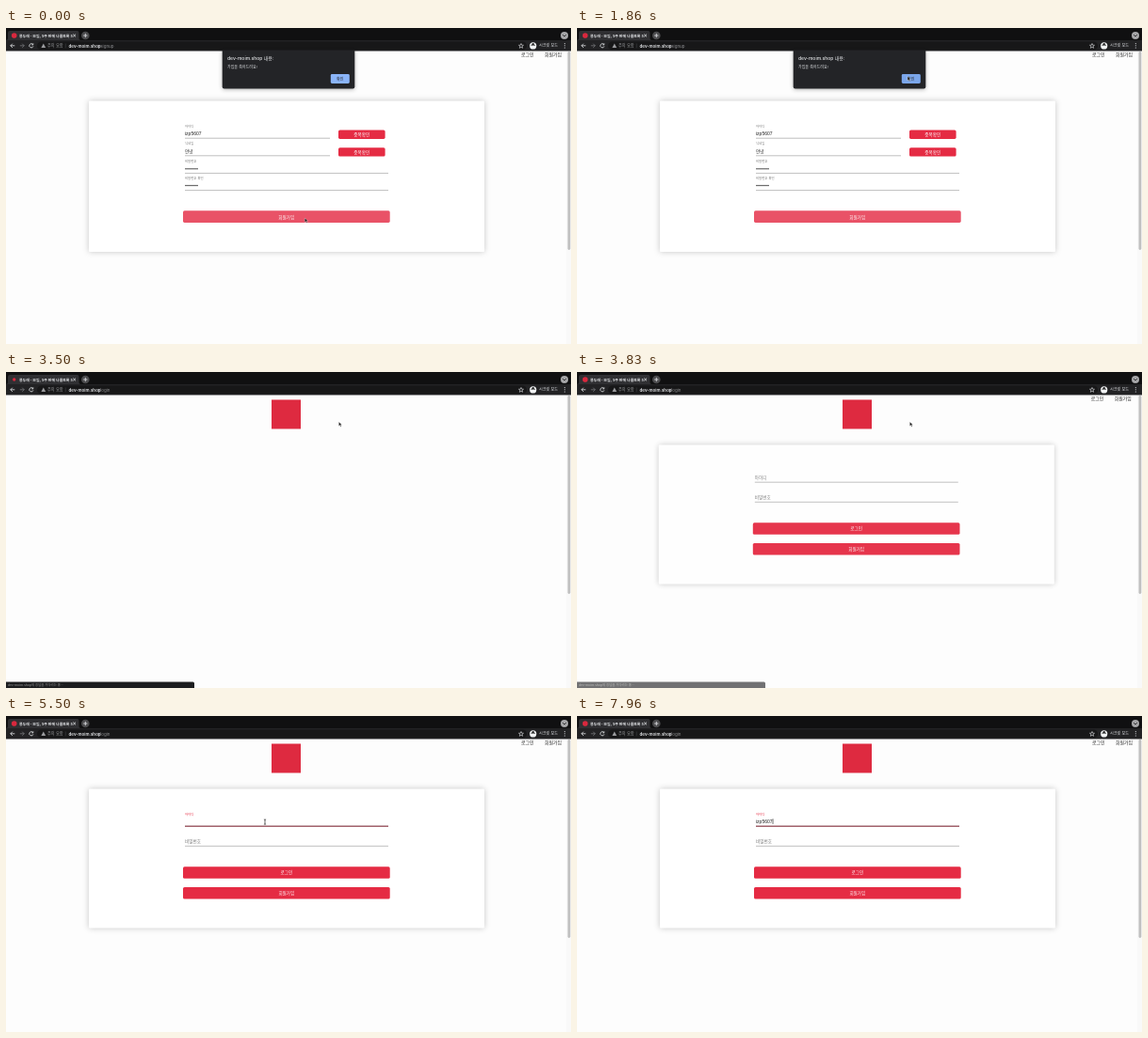
Animation of 600x336 px, one loop 8 s. Source, as an HTML page:

```html
<!DOCTYPE html>
<html lang="ko">
<head>
<meta charset="utf-8">
<style>
html, body { margin: 0; width: 100%; height: 100%; overflow: hidden; background: #fdfdfd; }
svg { display: block; width: 100%; height: 100%; }
text { font: 4.6px "Noto Sans CJK KR", "Noto Sans CJK", sans-serif; white-space: pre; }
.mid { text-anchor: middle; }
.bold { font-weight: 700; }
.latin { font: 5px "Liberation Sans", sans-serif; }
.small { font-size: 3.4px; }
.card { fill: #fff; filter: drop-shadow(0 0 3px rgba(0, 0, 0, .22)); }
.line { stroke: #949494; stroke-width: .6; }
.icon { fill: none; stroke: #e8eaed; stroke-width: .8; }
</style>
</head>
<body>
<svg viewBox="0 0 600 336">
  <rect width="600" height="336" fill="#fdfdfd"/>
  <rect x="595" y="24" width="5" height="312" fill="#f9f9f9"/>
  <rect x="596.5" y="25" width="2.8" height="211" rx="1.4" fill="#c0c0c0"/>
  <rect x="282" y="29.5" width="31" height="31" fill="#de2a40"/>

  <g id="nav" fill="#222">
    <text x="547" y="29.6" style="font-size:4.9px">로그인</text>
    <text x="572" y="29.6" style="font-size:4.9px">회원가입</text>
  </g>

  <g id="signup">
    <rect class="card" x="88" y="77.5" width="420" height="160.5" rx="1"/>
    <g id="signupForm"></g>
    <rect id="submit" x="188" y="194.3" width="219.7" height="12.6" rx="1.6" fill="#e95267"/>
    <text class="mid" x="297.8" y="202.5" fill="#fff">회원가입</text>
  </g>

  <g id="login">
    <rect class="card" x="88" y="77.5" width="420" height="148" rx="1"/>
    <path id="idLine" class="line" d="M190 117.2H406"/>
    <path class="line" d="M190 138.3H406"/>
    <path id="focusLine" d="M-108 0H108" stroke="#9c3446" stroke-width=".9"/>
    <text id="idLabel">아이디</text>
    <text x="190" y="134.8" fill="#777">비밀번호</text>
    <g id="loginButtons"></g>
    <text id="typed" class="latin" x="190" y="114" fill="#222"></text>
    <rect id="caret" y="109.3" width=".6" height="5.6" fill="#111"/>
    <g id="suggest">
      <rect x="189.3" y="117.8" width="60" height="16" rx="1" fill="#202124" stroke="#555" stroke-width=".3"/>
      <text class="bold" x="193" y="127.3" fill="#fff" style="font:600 4px Inter,sans-serif">izp3948</text>
    </g>
  </g>

  <g id="status">
    <path d="M0 329.5H198.5Q200 329.5 200 331V336H0Z" fill="#1c1d1f"/>
    <text class="small" x="2" y="334" fill="#9a9a9a">dev-moim.shop의 응답을 기다리는 중…</text>
  </g>

  <g id="browser">
    <rect width="600" height="24.5" fill="#222224"/>
    <rect width="600" height="13" fill="#101011"/>
    <path d="M0 13Q2 13 2 11V5Q2 3 4 3H75.5Q77.5 3 77.5 5V11Q77.5 13 79.5 13Z" fill="#303033"/>
    <rect x="33" y="14.5" width="520" height="8.8" rx="4.4" fill="#171718"/>
    <circle id="favicon" cx="8.7" cy="8" fill="#d9283e"/>
    <text class="bold" x="14" y="9.5" fill="#e8eaed" style="font-size:3.9px">콩두레 - 모임, 5주 만에 나를토록 5</text>
    <path class="icon" d="M71.2 6.6l2.8 2.8m0-2.8l-2.8 2.8"/>
    <circle cx="84.3" cy="8" r="4.3" fill="#4b4b4d"/>
    <path class="icon" d="M82.2 8h4.2m-2.1-2.1v4.2"/>
    <circle cx="593" cy="8" r="4" fill="#a5a5a7"/>
    <path d="M591.2 7.2l1.8 1.8 1.8-1.8" fill="none" stroke="#222" stroke-width=".9"/>
    <path class="icon" d="M9.3 18.8H4.8m2.1-2.1l-2.1 2.1 2.1 2.1"/>
    <path class="icon" style="stroke:#77787b" d="M14.8 18.8h4.5m-2.1-2.1l2.1 2.1-2.1 2.1"/>
    <path class="icon" d="M28.4 17.3A2.1 2.1 0 1 0 28.9 19.4M28.8 16.3v1.6h-1.6"/>
    <path d="M39.8 16.5L42.2 21H37.4Z" fill="#9a9b9e"/>
    <text x="44" y="20.4" fill="#9a9b9e" style="font-size:4.2px">주의 요함</text>
    <path d="M63.3 16.5v4.8" stroke="#55565a" stroke-width=".4"/>
    <text x="66.5" y="20.5" fill="#e8eaed" style="font:600 4.5px Inter,sans-serif">dev-moim.shop</text>
    <text id="path" x="98.6" y="20.5" fill="#909194" style="font:4.5px Inter,sans-serif"></text>
    <path class="icon" style="stroke-width:.6" d="M547 16.5l.7 1.7 1.8.1-1.4 1.2.5 1.8-1.6-1-1.6 1 .5-1.8-1.4-1.2 1.8-.1z"/>
    <circle cx="559.7" cy="18.9" r="3.6" fill="#f1f3f4"/>
    <path d="M557.4 18.5h4.6M558.5 18l.4-1.4h1.6l.4 1.4" stroke="#222" stroke-width=".6" fill="#222"/>
    <text x="566" y="20.4" fill="#e8eaed" style="font-size:4.1px">시크릿 모드</text>
    <path d="M593.3 16.6v.01M593.3 18.8v.01M593.3 21v.01" stroke="#e8eaed" stroke-width="1.1" stroke-linecap="round"/>
  </g>

  <g id="dialog">
    <path d="M229.7 24H370.3V62.5Q370.3 64.5 368.3 64.5H231.7Q229.7 64.5 229.7 62.5Z" fill="#232427" style="filter:drop-shadow(0 1px 2px rgba(0,0,0,.3))"/>
    <text x="235" y="33.8" fill="#e8eaed" style="font:500 5px Inter,'Noto Sans CJK KR',sans-serif">dev-moim.shop 내용:</text>
    <text x="235" y="42.6" fill="#e8eaed" style="font-size:4px">가입을 축하드려요!</text>
    <rect id="ok" x="344.8" y="49" width="20" height="10" rx="1.4"/>
    <text class="mid" x="354.8" y="55.6" fill="#202124" style="font-size:4.1px">확인</text>
  </g>

  <path id="arrow" d="M0 0V4.6L1.1 3.6 1.9 5.3 2.7 4.9 1.9 3.3H3.3Z" fill="#111" stroke="#fff" stroke-width=".35"/>
  <path id="beam" d="M-1.1 -2.7Q0 -2.7 0 -2V2Q0 2.7 -1.1 2.7M1.1 -2.7Q0 -2.7 0 -2M0 2Q0 2.7 1.1 2.7" fill="none" stroke="#222" stroke-width=".7"/>
</svg>
<script>
const LOOP = 8000;
const CLOSE = 2950, STATUS = 3100, LEAVE = 3430, LOADED = 3680, SETTLED = 3980, FOCUS = 4850;
const NAME = 'izp5607';
const KEYS = [5900, 6120, 6350, 6880, 7080, 7280, 7500];
const POINTER = [[0, 317.3, 202], [250, 317.3, 202], [1150, 351, 51.3], [2950, 351, 51.3],
  [3250, 353.4, 53], [4120, 353.4, 53], [4520, 275, 112.6], [LOOP, 275, 112.6]];

const el = id => document.getElementById(id);
const show = (id, on) => el(id).setAttribute('visibility', on ? 'visible' : 'hidden');
const set = (id, attrs) => {
  for (const key in attrs) el(id).setAttribute(key, attrs[key]);
};
const ramp = (t, start, length) => {
  const p = Math.min(1, Math.max(0, (t - start) / length));
  return p * p * (3 - 2 * p);
};

const button = (x, y, w, h, label) =>
  `<rect x="${x}" y="${y}" width="${w}" height="${h}" rx="1.6" fill="#e52b43"/>
   <text class="mid" x="${x + w / 2}" y="${y + h / 2 + 1.8}" fill="#fff">${label}</text>`;
const field = (y, label, value, right, cls = '') =>
  `<text class="small" x="190" y="${y - 11.6}" fill="#777">${label}</text>
   <text class="${cls}" x="190" y="${y - 3.2}" fill="#222">${value}</text>
   <path class="line" d="M190 ${y}H${right}"/>`;
const secret = y => Array.from({ length: 7 }, (_, i) =>
  `<circle cx="${191 + i * 2}" cy="${y}" r=".75" fill="#222"/>`).join('');

el('signupForm').innerHTML =
  field(117.2, '아이디', NAME, 344, 'latin') + field(135.8, '닉네임', '안녕', 344) +
  field(154.4, '비밀번호', '', 406) + secret(149.8) +
  field(172.6, '비밀번호 확인', '', 406) + secret(167.6) +
  button(353, 108.5, 49.6, 9.4, '중복확인') + button(353, 127.2, 49.6, 9.4, '중복확인');
el('loginButtons').innerHTML =
  button(188, 160.3, 219.7, 12.5, '로그인') + button(188, 182, 219.7, 12.5, '회원가입');

function pointerAt(t) {
  const i = POINTER.findIndex(p => p[0] > t);
  const [t0, x0, y0] = POINTER[i - 1], [t1, x1, y1] = POINTER[i];
  const p = ramp(t, t0, t1 - t0);
  return [x0 + (x1 - x0) * p, y0 + (y1 - y0) * p];
}

function draw(t) {
  const loaded = t >= LOADED, focused = t >= FOCUS;
  const [x, y] = pointerAt(t);
  const overField = loaded && y > 104;
  const shift = `translate(${loaded && t < SETTLED ? -1.2 : 0} 0)`;

  show('dialog', t < CLOSE);
  set('ok', { fill: x > 345 && y < 59 ? '#7ba6ea' : '#8ab4f8' });
  set('submit', { fill: t < CLOSE ? '#e95267' : '#e52b43' });
  show('signup', t < LEAVE);
  show('nav', t < LEAVE || loaded);
  set('nav', { transform: shift });
  set('login', { transform: shift, opacity: .85 + .15 * ramp(t, LOADED, 250),
    display: loaded ? 'inline' : 'none' });
  show('status', t >= STATUS && t < SETTLED);
  set('status', { opacity: 1 - ramp(t, LOADED, SETTLED - LOADED) * .75 });
  set('favicon', { r: t >= LEAVE && t < LOADED ? 1.7 : 2.8 });
  el('path').textContent = t < LEAVE ? '/signup' : '/login';

  const lift = ramp(t, FOCUS, 200);
  set('idLabel', { fill: focused ? '#e52b43' : '#777',
    transform: `translate(190 ${113.8 - 8.2 * lift}) scale(${1 - .26 * lift})` });
  set('focusLine', { transform: `translate(298 117.2) scale(${lift} 1)` });
  show('focusLine', focused);
  el('idLine').style.stroke = overField ? '#444' : '#949494';

  const count = KEYS.filter(k => t >= k).length;
  const lastChange = count ? KEYS[count - 1] : FOCUS;
  el('typed').textContent = NAME.slice(0, count);
  set('caret', { x: 190.2 + (count ? el('typed').getComputedTextLength() : 0) });
  show('caret', focused && (t - lastChange) % 1000 < 500);
  show('suggest', count > 0 && count < 4);

  show('arrow', !overField);
  show('beam', overField && !count);
  set('arrow', { transform: `translate(${x} ${y})` });
  set('beam', { transform: `translate(${x} ${y})` });
}

const begin = performance.now();
function tick() {
  draw((performance.now() - begin) % LOOP);
  requestAnimationFrame(tick);
}
tick();
</script>
</body>
</html>
```
